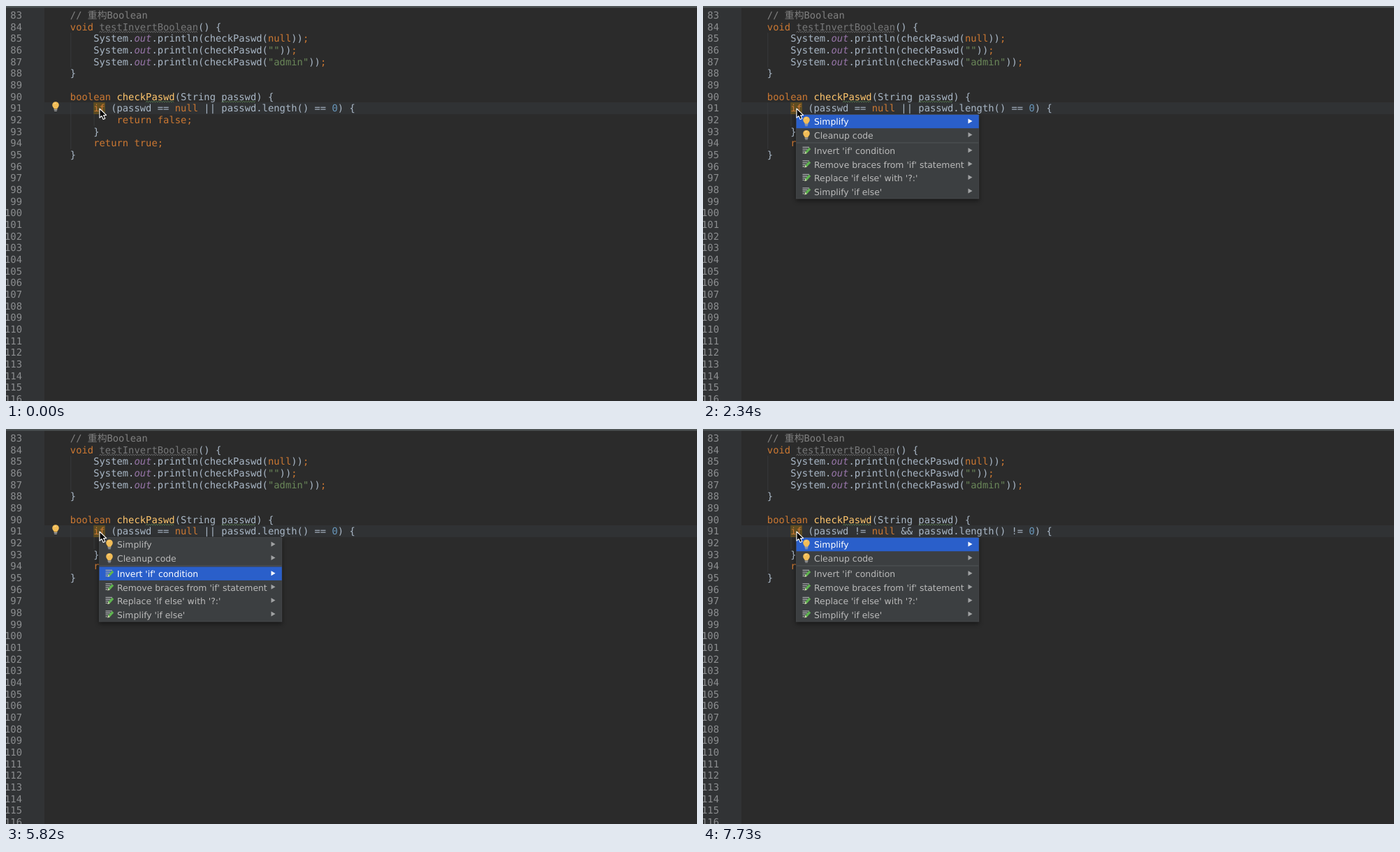
An HTML page for the animation above (8000 ms loop, 989 by 566 pixels).

```html
<!DOCTYPE html>
<html lang="en">
<head>
<meta charset="utf-8">
<title>Invert if condition</title>
<style>
  html, body { margin: 0; width: 100%; height: 100%; overflow: hidden; background: #2b2b2b; }
  svg { display: block; width: 100vw; height: 100vh; text-rendering: geometricPrecision; }
  .code { font: 13.84px "DejaVu Sans Mono", "Noto Sans CJK SC", "Noto Sans CJK", monospace; fill: #a9b7c6; }
  .gutter { fill: #8c8e90; text-anchor: end; }
  .keyword { fill: #cc7832; }
  .string { fill: #6a8759; }
  .number { fill: #6897bb; }
  .field { fill: #9876aa; font-style: italic; }
  .comment { fill: #808080; }
  .unused { fill: #777879; }
  .method { fill: #ffc66d; }
  .menu { font: 12.4px "DejaVu Sans", sans-serif; fill: #bbb; }
  .menu .selected { fill: #fff; }
  .menu .panel { fill: #3c3f41; stroke: #4b4e50; stroke-width: .7; filter: drop-shadow(0 3px 3px #0007); }
  .separator { stroke: #515456; }
  .wave { fill: none; stroke-width: .9; }
</style>
</head>
<body>
<svg id="stage" viewBox="0 0 989 566" preserveAspectRatio="none"></svg>
<script>
const DURATION = 8000, CHAR = 8.333, LINE = 16.67, LEFT = 58.5, FIRST_LINE = 83;
const stage = document.getElementById('stage');

const baseline = number => 18 + (number - FIRST_LINE) * LINE;
const column = n => LEFT + n * CHAR;
const rect = (x, y, w, h, fill) => `<rect x="${x}" y="${y}" width="${w}" height="${h}" fill="${fill}"/>`;
const path = (d, attrs) => `<path d="${d}" ${attrs}/>`;
const text = (x, y, content, attrs = '') => `<text x="${x}" y="${y}" ${attrs}>${content}</text>`;

const sourceLines = inverted => {
  const [equals, join] = inverted ? ['!=', '&&'] : ['==', '||'];
  return `    // 重构Boolean
    void testInvertBoolean() {
        System.out.println(checkPaswd(null));
        System.out.println(checkPaswd(""));
        System.out.println(checkPaswd("admin"));
    }

    boolean checkPaswd(String passwd) {
        if (passwd ${equals} null ${join} passwd.length() ${equals} 0) {
            return ${inverted};
        }
        return ${!inverted};
    }`.split('\n');
};

const TOKENS = [
  ['comment', /^\/\/.*/],
  ['string', /^"[^"]*"/],
  ['keyword', /^(?:(?:void|boolean|if|return|null|true|false)\b|;)/],
  ['unused', /^testInvertBoolean/],
  ['method', /^checkPaswd(?=\(String)/],
  ['field', /^out\b/],
  ['number', /^\d+/],
  ['', /^(?:\w+|.)/]
];

function highlight(line) {
  let html = '';
  while (line) {
    const [kind, pattern] = TOKENS.find(([, p]) => p.test(line));
    const token = line.match(pattern)[0];
    const safe = token.replace('&', '&amp;');
    html += kind ? `<tspan class="${kind}">${safe}</tspan>` : safe;
    line = line.slice(token.length);
  }
  return html;
}

function wave(from, to, line, color) {
  const y = baseline(line) + 1.6;
  let d = `M${column(from)} ${y + 1.6}`;
  for (let x = column(from) + 1.67, up = true; x <= column(to); x += 1.67, up = !up) d += `L${x} ${up ? y : y + 1.6}`;
  return path(d, `class="wave" stroke="${color}"`);
}

function guide(col, firstLine, lastLine) {
  const top = baseline(firstLine) - 13;
  return rect(column(col) + .5, top, .9, (lastLine - firstLine + 1) * LINE, '#3a3b3c');
}

function editor({ inverted = false, bulb, caret }) {
  let html = rect(0, 0, 989, 566, '#2b2b2b') + rect(0, 0, 55, 566, '#313335') +
    rect(55, 138, 934, 17, '#303234') + rect(0, 0, 989, 2.5, '#4f5556') +
    guide(4, 85, 87) + guide(4, 91, 94) + guide(8, 92, 92) +
    rect(125.3, 138, 16.6, 17, '#5f4d22') + '<g class="code">';
  for (let n = FIRST_LINE; n <= 116; n++) html += text(23, baseline(n), n, 'class="gutter"');
  sourceLines(inverted).forEach((line, i) => {
    const code = line.trimStart();
    html += text(column(line.length - code.length), baseline(FIRST_LINE + i), highlight(code));
  });
  html += '</g>' + wave(9, 26, 84, '#777879') + wave(17, 22, 90, '#5f8a5b') + wave(30, 36, 90, '#5f8a5b');
  if (bulb) html += bulbIcon(71, 144);
  if (caret) html += rect(133.3, 138, 1.7, 17, '#bbb');
  return html;
}

const bulbIcon = (x, y) => `<g transform="translate(${x} ${y})">` +
  path('M-2.3 3.5C-2.3 1.8-4.8 .8-4.8-2A4.8 4.8 0 0 1 4.8-2C4.8 .8 2.3 1.8 2.3 3.5Z', 'fill="#f2bd57"') +
  path('M-2-3.5Q-1.2-5 .5-5', 'fill="none" stroke="#ffe3a0"') +
  rect(-2.3, 4, 4.6, 1.2, '#b5b5b5') + rect(-1.8, 5.8, 3.6, 1.2, '#999') + '</g>';

const pencilIcon = (x, y) => `<g transform="translate(${x} ${y})">` +
  path('M-5.5-4.5H4M-5.5-1.8H1.5M-5.5 .9H-1M-5.5 3.6H-3', 'stroke="#a5a8aa" stroke-width="1.3"') +
  path('M-2.6 5.2L-1.8 1.8 3.8-4.2 6.3-2 .7 4.2Z', 'fill="#5fb350"') +
  path('M-2.6 5.2L-1.8 1.8 .7 4.2Z', 'fill="#d9d5b8"') + '</g>';

const panel = (width, top, bottom) =>
  `<rect class="panel" x="133.6" y="${top}" width="${width}" height="${bottom - top}"/>`;
const selection = (width, y) => rect(133.6, y - 9.9, width, 19.4, '#2a5fca');
const separator = (y, from, to) => path(`M${from} ${y}H${to}`, 'class="separator"');

function refactorMenu() {
  const width = 259.4;
  const items = [
    [184, '1. Move...', 'F6'], [203.7, '2. Copy...', 'F5'],
    [241, '3. Delegate...'], [260.4, '4. Interface...'], [279.9, '5. Superclass...'], [299.3, '6. Subclass...'],
    [321.5, '7. Find and Replace Code Duplicates...'],
    [343.8, '8. Pull Members Up...'], [363.2, '9. Push Members Down...'],
    [382.7, '0. Use Interface Where Possible...'], [402.2, 'Replace Inheritance with Delegation...'],
    [421.6, 'Wrap Method Return Value...'],
    [443.8, 'Encapsulate Fields...'], [466, 'Generify...'], [488.2, 'Remove Unused Resources...']
  ];
  let html = '<linearGradient id="title" x2="0" y2="1"><stop stop-color="#4a4d4f"/>' +
    '<stop offset="1" stop-color="#3c3f41"/></linearGradient>' +
    panel(width, 155, 498) + rect(134, 155.4, 258.6, 18, 'url(#title)') +
    text(264.5, 168.6, 'Refactor This', 'text-anchor="middle"') +
    separator(222.5, 134, 236) + separator(222.5, 289, 392.6) +
    text(262.5, 227.1, 'Extract', 'text-anchor="middle" fill="#8a8c8d"') + selection(width, 184);
  for (const y of [310.5, 332.5, 432.5, 455, 477]) html += separator(y, 134, 392.6);
  items.forEach(([y, label, shortcut], i) => {
    const cls = i ? '' : 'class="selected"';
    html += text(141, y + 4.7, label, cls);
    if (shortcut) html += text(383, y + 4.7, shortcut, 'text-anchor="end"');
  });
  return html;
}

function intentionMenu(selected) {
  const width = 261.2;
  const items = [
    [165.7, 'Simplify'], [185.2, 'Cleanup code'], [207.4, "Invert 'if' condition"],
    [226.9, "Remove braces from 'if' statement"], [246.3, "Replace 'if else' with '?:'"], [265.8, "Simplify 'if else'"]
  ];
  let html = panel(width, 155.6, 276) + separator(196, 134, 394.5);
  items.forEach(([y, label], i) => {
    const active = i === selected;
    if (active) html += selection(width, y);
    html += (i < 2 ? bulbIcon : pencilIcon)(148, y - .5) +
      text(159, y + 4.7, label, active ? 'class="selected"' : '') +
      path(`M379.5 ${y - 4.2}L385.5 ${y - .7}L379.5 ${y + 2.8}Z`, `fill="${active ? '#fff' : '#a0a2a3'}"`);
  });
  return html;
}

const pointer = path('M134 147V160.2L137 157.5 139.2 162.4 141.8 161.2 139.6 156.6 143.6 156.4Z',
  'fill="#000" stroke="#fff" stroke-width="1.1" stroke-linejoin="round"');

const steps = [
  { at: 0, bulb: true },
  { at: 300, menu: refactorMenu },
  { at: 1740, caret: true },
  { at: 2340, menu: intentionMenu, selected: 0 },
  { at: 2520, menu: intentionMenu, selected: 0, bulb: true },
  { at: 3270, menu: intentionMenu, selected: 1, bulb: true },
  { at: 3420, menu: intentionMenu, selected: 2, bulb: true },
  { at: 3870, menu: intentionMenu, selected: 3, bulb: true },
  { at: 5820, menu: intentionMenu, selected: 2, bulb: true },
  { at: 6270, caret: true },
  { at: 6410, caret: true, inverted: true },
  { at: 7430, caret: true, inverted: true, bulb: true },
  { at: 7730, menu: intentionMenu, selected: 0, inverted: true }
];

let shown;
function draw(now) {
  const time = now % DURATION;
  const step = steps.findLast(s => s.at <= time) || steps[0];
  if (step !== shown) {
    const menu = step.menu ? `<g class="menu">${step.menu(step.selected)}</g>` : '';
    stage.innerHTML = editor(step) + menu + pointer;
    shown = step;
  }
}

const start = performance.now();
function tick() {
  draw(performance.now() - start);
  requestAnimationFrame(tick);
}
tick();
</script>
</body>
</html>
```
